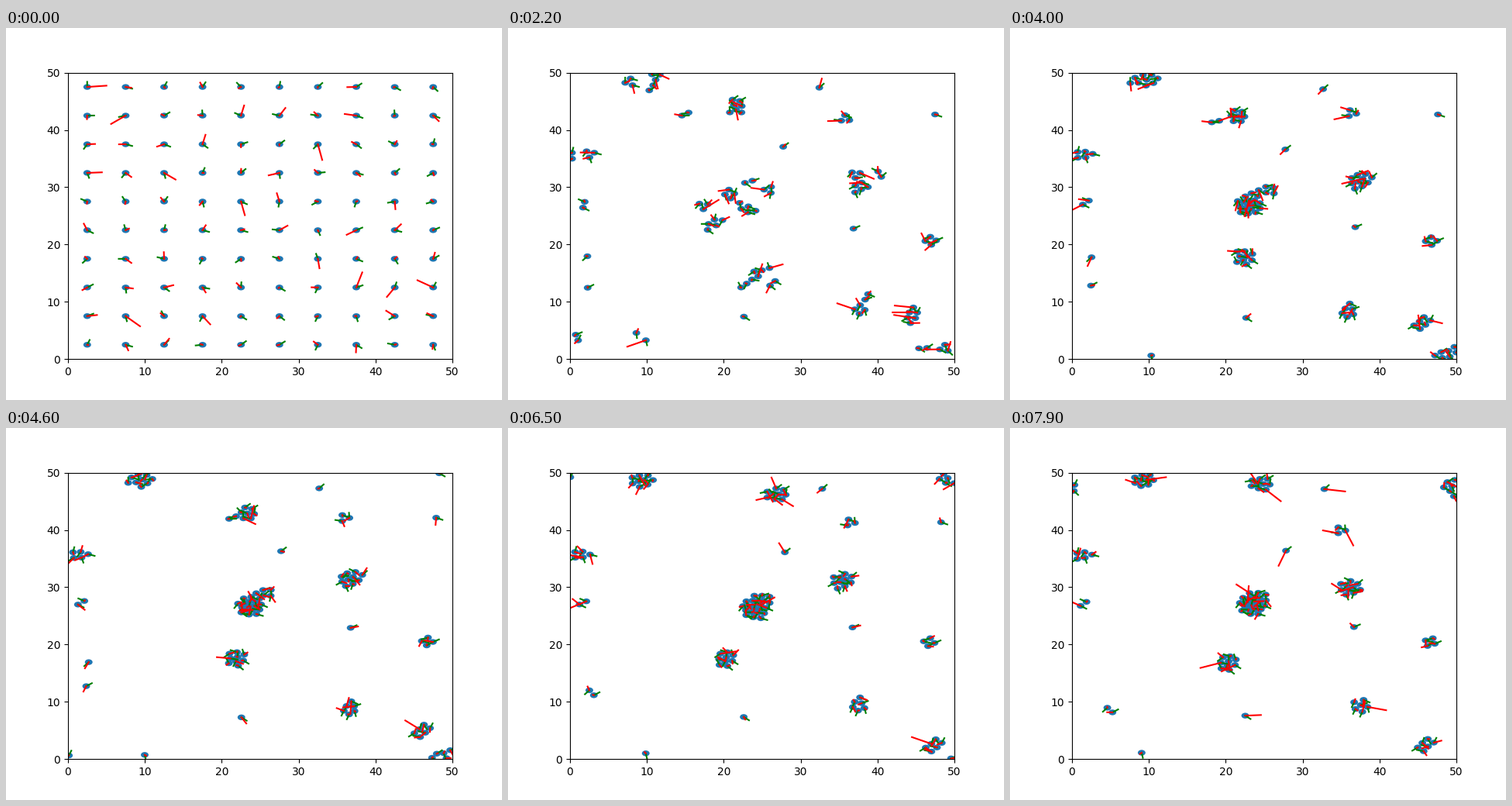
These frames come from a looping animation (640x480 px, 8000 ms). A matplotlib script:

```python
import numpy as np
import matplotlib.pyplot as plt
from matplotlib.animation import FuncAnimation
from matplotlib.collections import EllipseCollection, LineCollection

SIZE = 50.0
FRAMES = 80
SUBSTEPS = 6
SPACING = 1.05

# Which colony each cell of the starting grid joins, top row first.
COLONIES = """
AAAACCDMMM
CCACCCEEEF
GGNNNUPPPG
GNNNNNPPPG
HNNNNNPPPR
HNNNNNPQRR
INNNOOOSLR
JANOOOSSLL
MBOOTOSSLL
MAAACCSMLM
""".split()

# Colony centres: one resting place, or a waypoint for each time in KEYS.
KEYS = (22, 40, 53, 65, 79)
PATHS = {
    "A": [(9.3, 48.6)],
    "B": [(10.3, 2.5), (10.4, 0), (9.8, 0.1), (10, 0.4), (9.2, 0.6)],
    "C": [(20.4, 42.8), (20.8, 41.5), (25.2, 42.8), (26.8, 45.7), (24.5, 47.6)],
    "D": [(32.5, 46.8)],
    "E": [(35.6, 41.4), (36.2, 42.5), (35.5, 40.8), (36.5, 41.2), (35, 40)],
    "F": [(47, 42.8), (47.4, 42.7), (47.8, 42), (47.9, 41.5), (49.2, 46.2)],
    "G": [(1.6, 35.5)],
    "H": [(1.4, 27.6)],
    "I": [(2.3, 18.1), (2.4, 17.9), (2.4, 16.4), (2.4, 12.2), (4.5, 9)],
    "J": [(2.4, 12.1), (2.7, 12.5), (2.3, 12.6), (3, 11.4), (5, 8.2)],
    "L": [(45.2, 6.6), (46, 5.6), (47, 2.8), (47.5, 2), (46.2, 2.2)],
    "M": [(49.7, 2.9), (49.3, 1.2), (49.3, 0.2), (49.5, -0.8), (49.7, -2.2)],
    "N": [(24.6, 27.8), (25.3, 27.8), (26, 27), (25.4, 26.7), (24.6, 27.2)],
    "O": [(25.9, 14.9), (23.3, 18.2), (22.1, 17.7), (20.9, 17.8), (20.8, 17)],
    "P": [(39, 31), (38.2, 31), (36.4, 31.8), (36, 31), (36.6, 29.7)],
    "Q": [(36.7, 22.9)],
    "R": [(47, 20.2)],
    "S": [(39.2, 9.3), (36.7, 8.4), (38, 9.5), (38, 9.5), (38, 9.4)],
    "T": [(22.3, 7.2)],
    "U": [(27.8, 36.2)],
}
# Headings of the loners, in degrees.
LONERS = {"B": -80, "D": 50, "F": -25, "I": 230, "J": 35, "Q": 30, "T": -40, "U": 45}

rng = np.random.default_rng(12)
colony = np.array(list("".join(COLONIES)))
count = len(colony)
same = colony[:, None] == colony[None, :]
np.fill_diagonal(same, False)
radius = 0.44 * np.sqrt(same.sum(axis=1) + 1)


def polar(length, angle):
    return np.stack([length * np.cos(angle), length * np.sin(angle)], axis=-1)


def home(t):
    """Centre of every cell's colony at step t."""
    centre = {}
    for name, path in PATHS.items():
        x, y = zip(*path)
        keys = KEYS[:len(path)]
        centre[name] = (np.interp(t, keys, x), np.interp(t, keys, y))
    return np.array([centre[name] for name in colony])


heading = rng.uniform(0, 2 * np.pi, count)
for name, degrees in LONERS.items():
    heading[colony == name] = np.radians(degrees)
polarity = polar(0.9, heading)

push_len = np.clip(np.abs(rng.normal(0, 1.15, (FRAMES, count))), 0.15, 2.8)
push = polar(push_len, rng.uniform(0, 2 * np.pi, (FRAMES, count)))
speed = rng.uniform(0.3, 0.5, count)


def contact(pos):
    """Short-range repulsion and adhesion, plus the lure of the nearest mate."""
    gap = pos[None, :] - pos[:, None]
    gap -= SIZE * np.round(gap / SIZE)
    dist = np.hypot(gap[..., 0], gap[..., 1])
    np.fill_diagonal(dist, np.inf)
    unit = gap / np.maximum(dist, 1e-6)[..., None]
    force = np.where(dist < SPACING, 0.25 * (dist - SPACING), 0)
    stick = same & (dist > SPACING) & (dist < 1.8)
    force = force + np.where(stick, 0.04 * (dist - SPACING), 0)
    mates = np.where(same, dist, np.inf)
    near = mates.argmin(axis=1)
    row = np.arange(count)
    reach = mates[row, near]
    lure = np.where((reach > SPACING) & (reach < 5.5), 0.25 / SUBSTEPS, 0)
    return (force[..., None] * unit).sum(axis=1) + lure[:, None] * unit[row, near]


def simulate():
    axis = np.arange(2.5, SIZE, 5)
    x, y = np.meshgrid(axis, axis[::-1])
    pos = np.column_stack([x.ravel(), y.ravel()])
    pos += SIZE * np.round((home(0) - pos) / SIZE)
    track = [pos.copy()]
    for t in range(1, FRAMES):
        goal = home(t)
        drift = goal - home(t - 1)
        settled = np.hypot(*(goal - pos).T) < radius + 3
        pos = pos + drift * settled[:, None] + 0.06 * push[t - 1]
        for _ in range(SUBSTEPS):
            away = goal - pos
            dist = np.hypot(*away.T)
            pull = np.minimum(speed, 0.1 * np.maximum(dist - radius, 0))
            step = pull / np.maximum(dist, 1e-6) / SUBSTEPS
            pos = pos + step[:, None] * away + contact(pos)
        track.append(pos.copy())
    return np.array(track) % SIZE


track = simulate()

fig, ax = plt.subplots(figsize=(6.4, 4.8), dpi=100)
ax.set_xlim(0, SIZE)
ax.set_ylim(0, SIZE)

ones = np.ones(count)
cells = EllipseCollection(ones, ones, 0 * ones, units="xy", offsets=track[0],
                          offset_transform=ax.transData,
                          facecolors="C0", edgecolors="none", zorder=1)
ax.add_collection(cells)


def add_arms(color):
    arms = LineCollection([], colors=color, linewidths=1.5,
                          capstyle="projecting", zorder=2)
    ax.add_collection(arms, autolim=False)
    return arms


green = add_arms("green")
red = add_arms("red")


def draw(i):
    pos = track[i]
    cells.set_offsets(pos)
    green.set_segments(np.stack([pos, pos + polarity], axis=1))
    red.set_segments(np.stack([pos, pos + push[i]], axis=1))
    return cells, green, red


anim = FuncAnimation(fig, draw, frames=FRAMES, interval=100, repeat=True)
plt.show()
```
